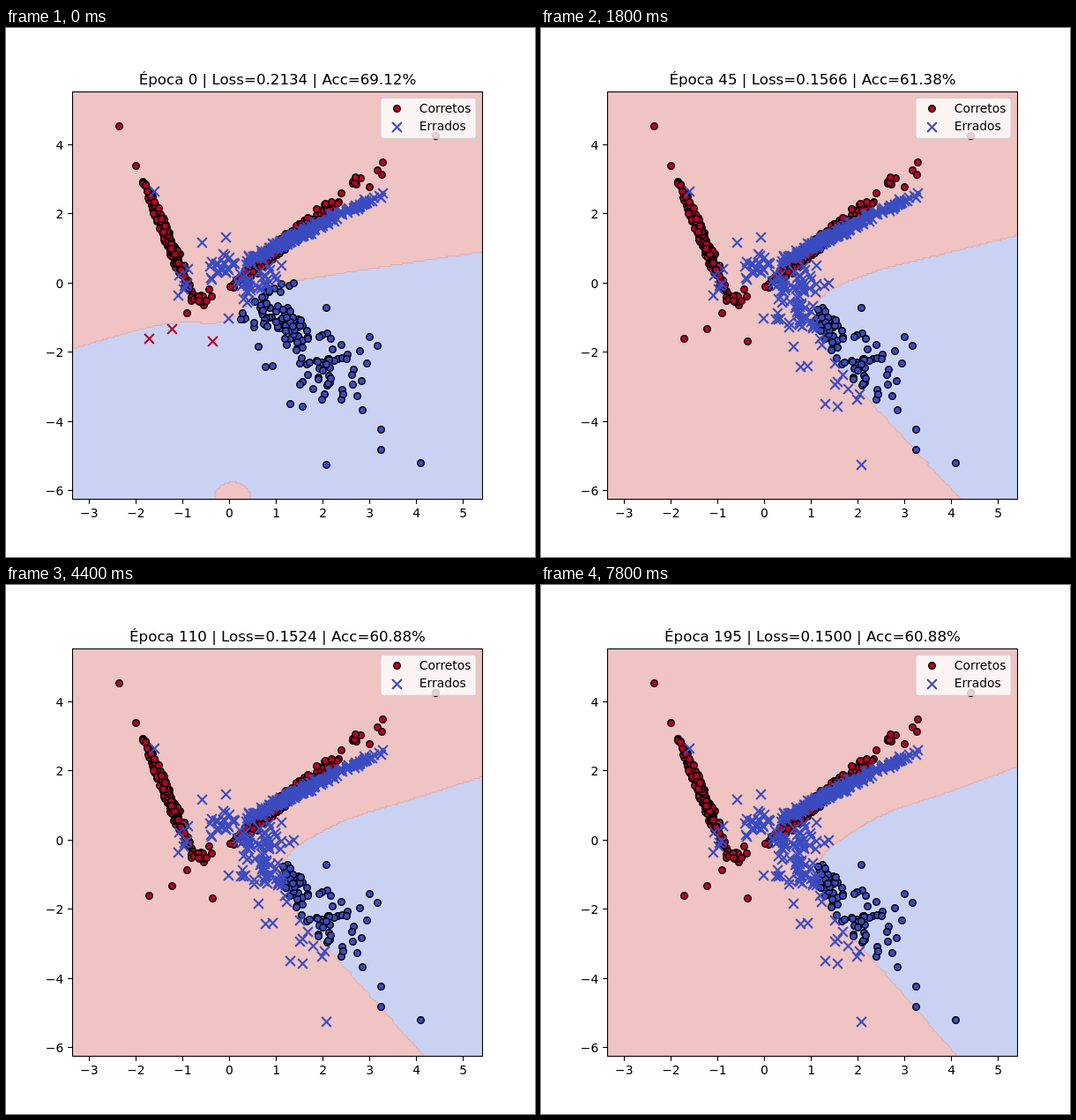
An HTML page for the animation above (8000 ms loop, 600 by 600 pixels).

```html
<!DOCTYPE html>
<html lang="pt">
<head>
<meta charset="utf-8">
<title>Treinamento</title>
<style>
html, body { margin: 0; width: 100%; height: 100%; overflow: hidden; background: #fff; }
svg { display: block; width: 100vw; height: 100vh; }
text { font-family: "DejaVu Sans", sans-serif; font-size: 13.89px; }
</style>
</head>
<body>
<svg viewBox="0 0 600 600">
  <defs>
    <circle id="dot" r="3.8" stroke="#000" stroke-width="1.39"/>
    <path id="cross" d="M-5.4-5.4 5.4 5.4M-5.4 5.4 5.4-5.4" fill="none" stroke-width="2.08"/>
    <clipPath id="axes"><rect x="75" y="72" width="465" height="462"/></clipPath>
  </defs>
  <rect width="600" height="600" fill="#fff"/>
  <rect x="75" y="72" width="465" height="462" fill="#efc4c3"/>
  <g clip-path="url(#axes)">
    <path id="region" fill="#cad2f4" stroke="#e39a8c" stroke-opacity=".75" stroke-width=".9"/>
    <g id="right"></g>
    <g id="wrong"></g>
  </g>
  <rect x="75.5" y="72.5" width="465" height="462" fill="none" stroke="#000" stroke-width="1.1"/>
  <g id="ticks"></g>
  <text id="title" x="308" y="64" text-anchor="middle" style="font-size:16.67px"></text>
  <rect x="424.9" y="79.4" width="108.4" height="46" rx="2.8" fill="#fff" fill-opacity=".8" stroke="#ccc" stroke-opacity=".8" stroke-width="1.39"/>
  <use href="#dot" x="443.5" y="91.5" fill="#b40426"/>
  <use href="#cross" x="443.5" y="112.5" stroke="#3b4cc0"/>
  <text x="468.8" y="96">Corretos</text>
  <text x="468.8" y="116.3">Errados</text>
</svg>
<script>
const $ = id => document.getElementById(id);
const RED = '#b40426', BLUE = '#3b4cc0';
const STEP = 200, LOOP = 8000;

let seed = 20;
function rand() {
  seed = seed + 0x6D2B79F5 | 0;
  let t = Math.imul(seed ^ seed >>> 15, 1 | seed);
  t = t + Math.imul(t ^ t >>> 7, 61 | t) ^ t;
  return ((t ^ t >>> 14) >>> 0) / 4294967296;
}
const gauss = () => Math.sqrt(-2 * Math.log(1 - rand())) * Math.cos(2 * Math.PI * rand());
function within(mean, sd, lo, hi) {
  let v;
  do v = mean + gauss() * sd; while (v < lo || v > hi);
  return v;
}

const points = [];
const add = (color, x, y) => points.push({ color, x: Math.floor(x) + .5, y: Math.floor(y) + .5 });

// Cloud along a line: x is a clipped bell, y follows the slope with some spread
function cloud(color, n, [mean, sd, lo, hi], y, slope, spread) {
  while (n--) {
    const x = within(mean, sd, lo, hi);
    add(color, x, y + (x - mean) * slope + within(0, spread, -2 * spread, 2 * spread));
  }
}
function place(color, ...xy) {
  for (let i = 0; i < xy.length; i += 2) add(color, xy[i], xy[i + 1]);
}

// Steep left arm, spread across x
for (let i = 0; i < 185; i++) {
  const y = within(243, 33, 172, 303);
  add(RED, 157 + (y - 175) * .42 + within(0, 2.6, -6, 6), y);
}
cloud(RED, 17, [221, 12, 208, 250], 307, -.45, 5);
cloud(RED, 180, [312, 34, 252, 386], 247.5, -.8, 5);
cloud(RED, 6, [396, 8, 380, 410], 181, -.5, 6);
place(RED, 128, 111, 147, 156, 427, 152, 421, 161, 426, 166, 396, 169, 412, 180,
  162, 352, 188, 341, 234, 355, 205, 323, 487, 122);

cloud(BLUE, 205, [325, 33, 272, 420], 238.5, -.5, 2.8);
cloud(BLUE, 16, [413, 18, 385, 441], 195, -.5, 2);
cloud(BLUE, 22, [246, 12, 228, 272], 269, -.1, 8);
cloud(BLUE, 6, [202, 5, 194, 210], 287, -.5, 7);
cloud(BLUE, 34, [285, 20, 250, 330], 285, 0, 10);
cloud(BLUE, 5, [260, 7, 249, 272], 326, 0, 5);
cloud(BLUE, 76, [309, 20, 268, 346], 329, .6, 14);
cloud(BLUE, 48, [359, 19, 322, 396], 384, .7, 23);
cloud(BLUE, 9, [396, 10, 385, 414], 398, .5, 24);
place(BLUE, 168, 185, 222, 243, 249, 237, 363, 495, 470, 493, 425, 478, 425, 455, 404, 433,
  322, 426, 336, 429, 294, 384, 302, 383, 286, 361, 421, 360, 412, 350, 363, 317);

// Catmull-Rom curve snapped to the prediction grid
function curve(pts) {
  const out = [], gx = 465 / 175, gy = 462 / 235;
  const at = i => pts[Math.max(0, Math.min(pts.length - 1, i))];
  for (let i = 0; i < pts.length - 1; i++) {
    for (let k = 0; k <= 60; k++) {
      const u = k / 60;
      const [x, y] = [0, 1].map(c => {
        const [p, q, r, s] = [-1, 0, 1, 2].map(d => at(i + d)[c]);
        return q + u * (r - p + u * (2 * p - 5 * q + 4 * r - s + u * (3 * (q - r) + s - p))) / 2;
      });
      const sx = 75 + Math.round((x - 75) / gx) * gx, sy = 72 + Math.round((y - 72) / gy) * gy;
      const last = out[out.length - 1];
      if (!last || last[0] !== sx || last[1] !== sy) out.push([sx, sy]);
    }
  }
  return out;
}

// Untrained network: a wide region with a small dome at the bottom
function startRegion() {
  const edge = curve([[540, 254], [420, 272], [330, 287], [290, 298], [252, 332], [178, 336], [75, 364]]);
  const dome = curve(Array.from({ length: 9 }, (_, i) => {
    const a = Math.PI * i / 8;
    return [257 - 21 * Math.cos(a), 534 - 19 * Math.sin(a)];
  }));
  return [...edge, [70, 364], [70, 540], [236, 540], ...dome, [278, 540], [545, 540], [545, 254]];
}

// Later a wedge: its left side settles fast, its upper side keeps rising
function wedge(epoch) {
  const fast = 1 - Math.exp((10 - epoch) / 15);
  const slow = 1 - Math.exp((10 - epoch) / 100);
  const top = 251 - 53 * slow, foot = 458 + 23 * fast - 11 * slow;
  const side = 19 * fast;
  const edge = curve([
    [540, top], [460, 266 - 36 * slow], [390, 280 - 24 * slow], [345, 291 - 6 * slow],
    [302 + side, 305], [294 + side, 330], [310 + side, 370], [353 + side, 420], [foot, 534]
  ]);
  return [...edge, [foot, 540], [545, 540], [545, top]];
}

function inside(poly, x, y) {
  let hit = false;
  for (let i = 0, j = poly.length - 1; i < poly.length; j = i++) {
    const [ax, ay] = poly[i], [bx, by] = poly[j];
    if (ay > y !== by > y && x < ax + (bx - ax) * (y - ay) / (by - ay)) hit = !hit;
  }
  return hit;
}

// Epoch, loss, accuracy
const SCORES = [
  [0, .2134, 69.125], [10, .1773, 65.75], [45, .1566, 61.375], [75, .1539, 61],
  [110, .1524, 60.875], [165, .1508, 60.75], [195, .15, 60.875]
];
function scoreAt(epoch) {
  const i = Math.max(1, SCORES.findIndex(s => s[0] >= epoch));
  const a = SCORES[i - 1], b = SCORES[i];
  const log = e => Math.log(e + 5);
  const u = (log(epoch) - log(a[0])) / (log(b[0]) - log(a[0]));
  return [1, 2].map(k => a[k] + (b[k] - a[k]) * u);
}
function percent(v) {
  const n = Math.round(v * 8);
  return (n / 8 - (n % 4 === 1 ? .001 : 0)).toFixed(2); // ties round to even
}

function drawTicks() {
  const label = v => String(v).replace('-', '\u2212');
  let s = '';
  for (let v = -3; v <= 5; v++) {
    const x = 253.5 + 53.05 * v;
    s += `<path d="M${Math.floor(x) + .5} 535v4.9" stroke="#000" stroke-width="1.1"/>
      <text x="${x}" y="555" text-anchor="middle">${label(v)}</text>`;
  }
  for (let v = -6; v <= 4; v += 2) {
    const y = 289.4 - 39.25 * v;
    s += `<path d="M75 ${Math.floor(y) + .5}h-4.9" stroke="#000" stroke-width="1.1"/>
      <text x="65.3" y="${y + 5.1}" text-anchor="end">${label(v)}</text>`;
  }
  $('ticks').innerHTML = s;
}

function draw(epoch) {
  const poly = epoch ? wedge(epoch) : startRegion();
  $('region').setAttribute('d', 'M' + poly.map(p => p[0].toFixed(2) + ' ' + p[1].toFixed(2)).join('L') + 'Z');
  let right = '', wrong = '';
  for (const { color, x, y } of points) {
    const pos = `x="${x}" y="${y}"`;
    if (inside(poly, x, y) === (color === BLUE)) right += `<use href="#dot" ${pos} fill="${color}"/>`;
    else wrong += `<use href="#cross" ${pos} stroke="${color}"/>`;
  }
  $('right').innerHTML = right;
  $('wrong').innerHTML = wrong;
  const [loss, acc] = scoreAt(epoch);
  $('title').textContent = `Época ${epoch} | Loss=${loss.toFixed(4)} | Acc=${percent(acc)}%`;
}

let shown = -1;
const begin = performance.now();
function tick() {
  const t = Math.max(0, performance.now() - begin) % LOOP;
  const epoch = Math.floor(t / STEP) * 5;
  if (epoch !== shown) draw(shown = epoch);
  requestAnimationFrame(tick);
}
drawTicks();
tick();
</script>
</body>
</html>
```
